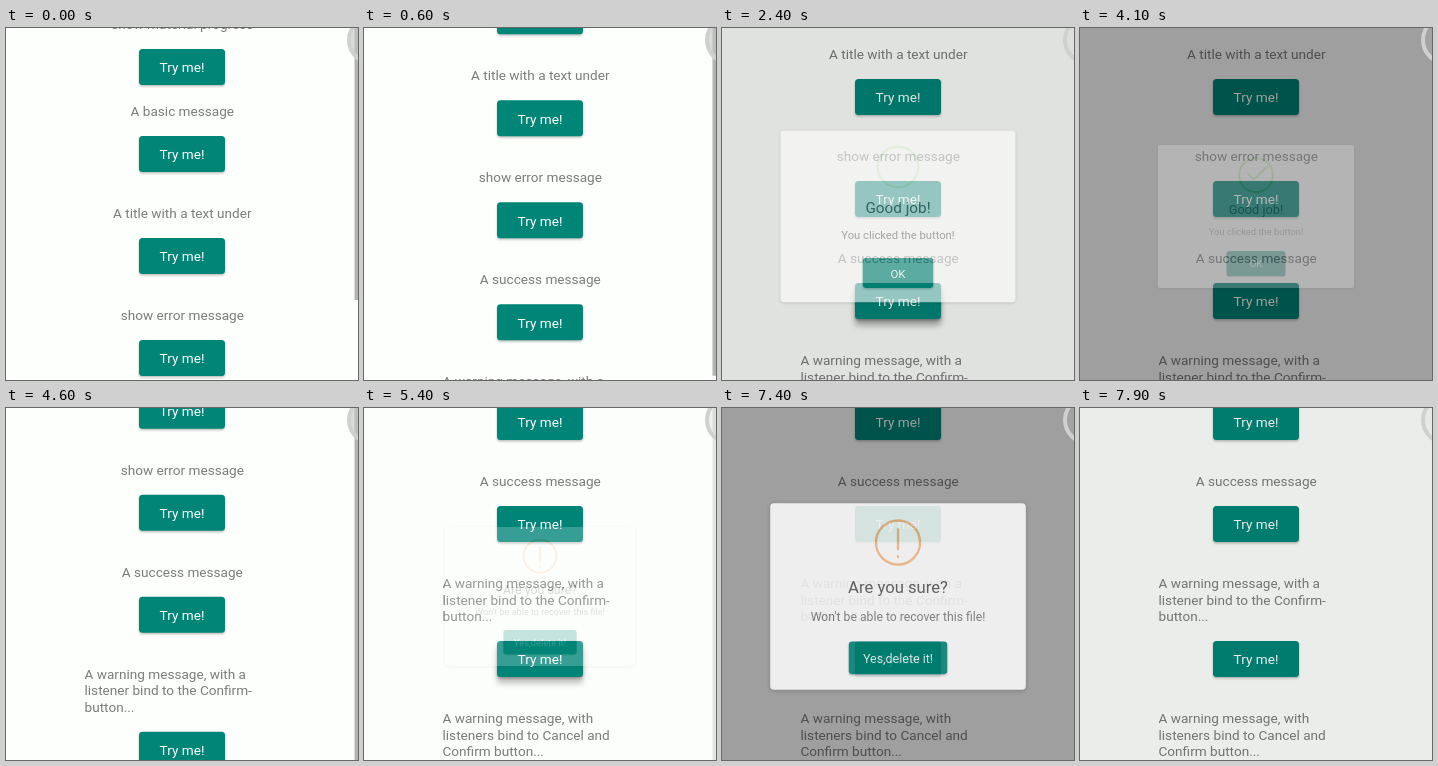
These frames come from a looping animation (352 px wide and 352 px high, 8 s). An HTML page:

```html
<!DOCTYPE html>
<html>
<head>
<meta charset="utf-8">
<style>
  html, body { margin: 0; height: 100%; overflow: hidden; background: #fdfffc; }
  svg { display: block; width: 100vw; height: 100vh; }
  text { font-family: Roboto, sans-serif; font-size: 13.6px; fill: #7b7c7b; }
  .mid { text-anchor: middle; }
  .label { fill: #fff; }
  .face { fill: #008577; }
  .shade { fill: #000; opacity: .25; filter: blur(1px); }
  .lift { fill: #000; opacity: 0; filter: blur(3px); }
  .card { fill: #fff; filter: drop-shadow(0 1px 2px rgba(0, 0, 0, .25)); }
  .title { font-size: 17.6px; fill: #575757; }
  .body { font-size: 12.9px; fill: #797979; }
  .mark { fill: none; stroke-width: 2.5; stroke-linecap: round; stroke-linejoin: round; }
  .green { stroke: #a5dc86; }
  .orange { stroke: #f8bb86; }
</style>
</head>
<body>
<svg viewBox="0 0 352 352">
  <g id="page"></g>
  <rect id="bar" x="348.5" width="4" y="0" fill="#b3b4b2"/>
  <rect id="dim" width="352" height="352"/>
  <circle id="knob" cx="366" cy="12" r="23" stroke="#cfd1ce" stroke-width="4" fill="#c4c5c3"/>
  <g id="success"></g>
  <g id="warning"></g>
</svg>
<script>
const $ = id => document.getElementById(id);
const clamp = v => Math.min(1, Math.max(0, v));
const span = (t, start, length) => clamp((t - start) / length);
const easeOut = (p, power = 3) => 1 - (1 - p) ** power;
const mix = (a, b, p) => a + (b - a) * p;

function button(cx, cy, width, height, label, size = 13.6, id = '') {
  const box = (kind, dy) => `<rect class="${kind}" x="${cx - width / 2}" y="${cy - height / 2 + dy}"
    width="${width}" height="${height}" rx="3.5"/>`;
  return `<g id="${id}">${box('lift', 6)}${box('shade', 1.5)}${box('face', 0)}
    <text class="mid label" x="${cx}" y="${cy + 5.3}" style="font-size:${size}px">${label}</text></g>`;
}

// Each entry: centre of the first line, centre of the button, id, lines
const entries = [
  [-4, 39, 'progressButton', 'show material progress'],
  [83, 126, 'basicButton', 'A basic message'],
  [185, 228, 'titleButton', 'A title with a text under'],
  [287, 330, 'errorButton', 'show error message'],
  [389, 432, 'successButton', 'A success message'],
  [491, 567, 'confirmButton', 'A warning message, with a', 'listener bind to the Confirm-', 'button...'],
  [626, 702, 'cancelButton', 'A warning message, with', 'listeners bind to Cancel and', 'Confirm button...']
];
$('page').innerHTML = entries.map(([textY, buttonY, id, ...lines]) =>
  lines.map((line, i) => lines.length > 1
    ? `<text x="78.5" y="${textY + 5 + i * 16.6}">${line}</text>`
    : `<text class="mid" x="176.3" y="${textY + 5}">${line}</text>`).join('') +
  button(176, buttonY, 86, 36, 'Try me!', 13.6, id)).join('');

// Dialogs are drawn around their own centre
const dialog = (icon, title, body, label, width) => `
  <rect class="card" x="-135" y="-98.5" width="270" height="197" rx="4"/>${icon}
  <text class="mid title" y="-3.5">${title}</text>
  <text class="mid body" y="26">${body}</text>
  ${button(0, 64.8, width, 34.5, label, 13.2)}`;

$('success').innerHTML = dialog(
  `<circle class="mark green" cy="-57" r="23.3" opacity=".3"/>
   <circle class="mark green" id="ring" cy="-57" r="23.3" pathLength="100"/>
   <path class="mark green" id="tick" d="M-11 -59L-3 -51L15 -68" pathLength="100"/>`,
  'Good job!', 'You clicked the button!', 'OK', 81);
$('warning').innerHTML = dialog(
  `<circle class="mark orange" cy="-57" r="23.3"/>
   <path class="mark orange" d="M0 -71V-50M0 -42.5V-42"/>`,
  'Are you sure?', "Won't be able to recover this file!", 'Yes,delete it!', 104);

function popScale(age) {
  if (age < 405) return mix(.7, 1.05, age / 405);
  if (age < 720) return mix(1.05, .95, (age - 405) / 315);
  return mix(.95, 1, span(age, 720, 180));
}

// Places a dialog and returns how dark it makes the page
function showDialog(id, t, open, close) {
  const age = t - open, leave = span(t, close, 450);
  const visible = age >= 0 && leave < 1;
  $(id).style.display = visible ? '' : 'none';
  if (visible) {
    const scale = popScale(age) * (1 - .4 * leave);
    $(id).setAttribute('transform', `translate(176 188.5) scale(${scale})`);
    $(id).setAttribute('opacity', mix(.2, 1, span(age, 0, 405)) * (1 - leave) ** 1.3);
  }
  return .375 * span(age, 0, 640) * (1 - easeOut(span(t, close + 380, 320), 2));
}

function reveal(id, p) {
  $(id).style.strokeDasharray = `${100 * p} 200`;
  $(id).style.opacity = p ? 1 : 0;
}

function press(id, t, start) {
  const amount = Math.min(span(t, start, 200), 1 - span(t, start + 350, 300));
  document.querySelector(`#${id} .lift`).style.opacity = .35 * amount;
}

function draw(t) {
  const scroll = 142 * easeOut(span(t, 50, 800)) + 17 * easeOut(span(t, 950, 500))
    + 157 * easeOut(span(t, 4480, 720));
  $('page').setAttribute('transform', `translate(0 ${-scroll})`);

  const barAlpha = t < 4480 ? 1 - span(t, 1700, 300) : 1 - span(t, 5200, 300);
  $('bar').setAttribute('height', 272 + .55 * scroll);
  $('bar').setAttribute('opacity', barAlpha);
  $('knob').setAttribute('fill-opacity', .1 + .5 * barAlpha);

  press('successButton', t, 2050);
  press('confirmButton', t, 5250);
  const dim = showDialog('success', t, 2203, 3792) + showDialog('warning', t, 5395, 7340);
  $('dim').setAttribute('opacity', dim);
  reveal('ring', span(t, 2450, 450));
  reveal('tick', span(t, 2700, 500));
}

function frame(now) {
  draw(Math.floor((now % 8000) / 100) * 100);
  requestAnimationFrame(frame);
}
draw(0);
requestAnimationFrame(frame);
</script>
</body>
</html>
```
